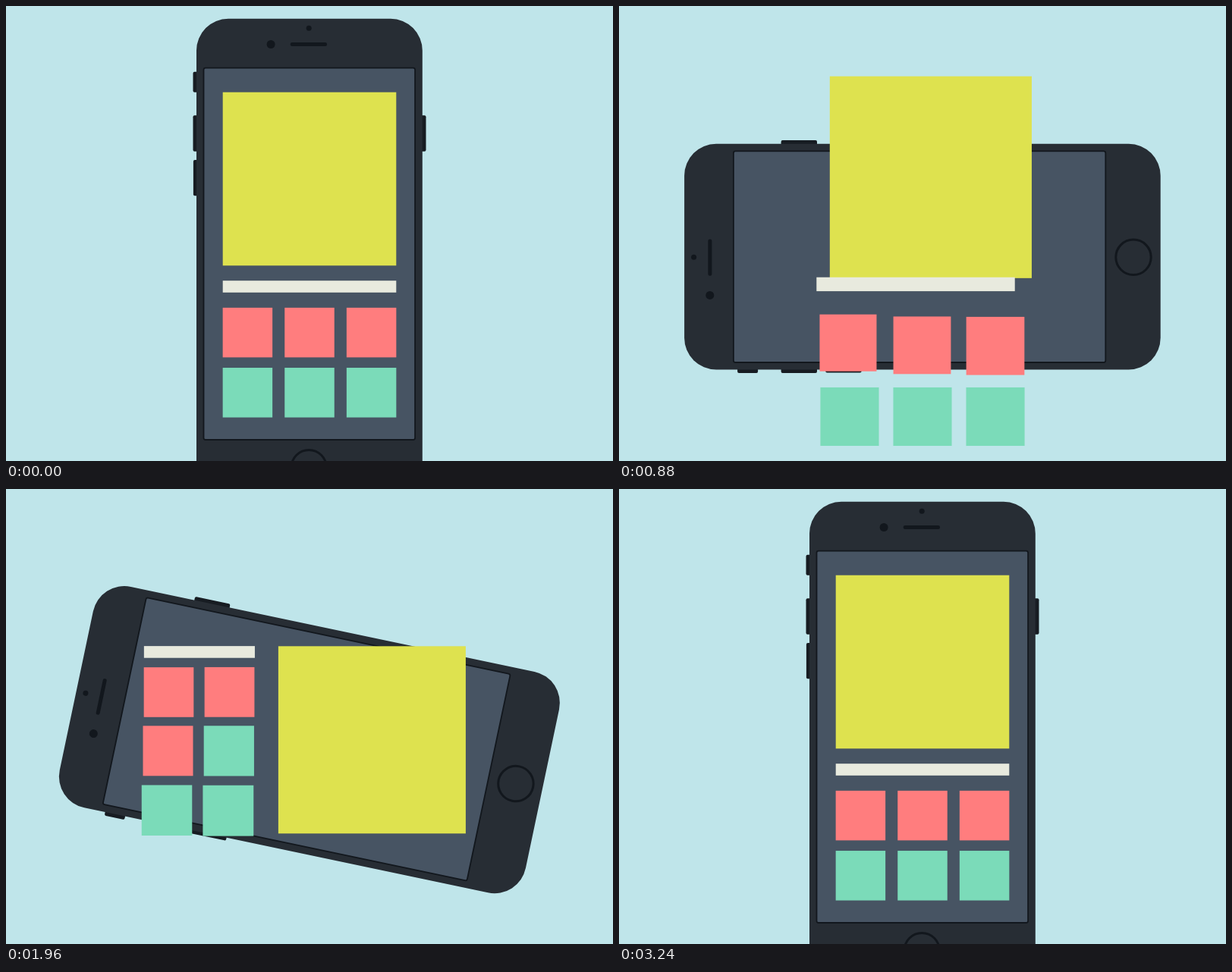
These frames come from a looping animation (800 px wide and 600 px high, 3.48 s). An HTML page with a canvas:

```html
<!DOCTYPE html>
<html lang="en">
<head>
<meta charset="utf-8">
<title>Responsive phone layout</title>
<style>
  html, body { margin: 0; width: 100%; height: 100%; overflow: hidden; background: #bfe5ea; }
  canvas { display: block; width: 800px; height: 600px; }
</style>
</head>
<body>
<canvas id="stage" width="800" height="600"></canvas>
<script>
const ctx = document.getElementById('stage').getContext('2d');
const LOOP = 3480, STEP = 40, UNIT = 870; // ms; one timeline unit is 870 ms
const CX = 399.9, CY = 330.6;
const COLOR = {
  back: '#bfe5ea', body: '#272d34', button: '#171c22', line: '#12171d', screen: '#475463',
  yellow: '#dee24f', bar: '#e8eade', red: '#ff7d7e', green: '#7bdbb9'
};

// Block boxes: centre x, centre y, width, height
const SIZE = 65.5;
const tall = [[400, 228, 228.6, 228.6], [400, 370, 228.6, 15.6]];
const wide = [[482.4, 330.8, 247, 247], [255, 215, 146, 15.6]];
for (let i = 0; i < 6; i++) {
  tall.push([400 + (i % 3 - 1) * 81.6, i < 3 ? 430.6 : 509.8, SIZE, SIZE]);
  wide.push([i % 2 ? 295 : 214.9, 268.1 + (i >> 1) * 77.1, SIZE, SIZE]);
}
const fills = ['yellow', 'bar', 'red', 'red', 'red', 'green', 'green', 'green'].map(n => COLOR[n]);

// Times in units, relative to the start of each half
const halves = [
  { from: tall, to: wide, a0: 0, a1: -90, spin: 0.071, lift: 0.07, liftDur: 0.7, amount: 0.177,
    move: 0.787, moveDur: 0.7, order: i => i },
  { from: wide, to: tall, a0: -90, a1: 0, spin: 0.001, lift: 0.07, liftDur: 0.63, amount: 0.106,
    move: 0.78, moveDur: 0.6, order: i => 7 - i }
];
const SPIN_DUR = 0.72, LIFT_GAP = 0.025, MOVE_GAP = 0.05;

const clamp = v => Math.min(1, Math.max(0, v));
const mix = (a, b, p) => a + (b - a) * p;
const sineInOut = u => (1 - Math.cos(Math.PI * u)) / 2;
const cubicInOut = u => u < 0.5 ? 4 * u ** 3 : 1 - 4 * (1 - u) ** 3;

function bezier(x1, y1, x2, y2) {
  const at = (a, b, s) => 3 * (1 - s) ** 2 * s * a + 3 * (1 - s) * s * s * b + s ** 3;
  return x => {
    if (x <= 0 || x >= 1) return clamp(x);
    let lo = 0, hi = 1;
    for (let i = 0; i < 30; i++) {
      const mid = (lo + hi) / 2;
      if (at(x1, x2, mid) < x) lo = mid; else hi = mid;
    }
    return at(y1, y2, lo);
  };
}
const spinEase = bezier(0.8, 0, 0.3, 1.23);

function roundBox(x, y, w, h, r) {
  ctx.beginPath();
  ctx.moveTo(x + r, y);
  ctx.arcTo(x + w, y, x + w, y + h, r);
  ctx.arcTo(x + w, y + h, x, y + h, r);
  ctx.arcTo(x, y + h, x, y, r);
  ctx.arcTo(x, y, x + w, y, r);
  ctx.closePath();
}

function disc(x, y, r) {
  ctx.beginPath();
  ctx.arc(x, y, r, 0, Math.PI * 2);
}

function button(x, y, h) {
  roundBox(x, y, 10, h, 2);
  ctx.fill();
}

function drawPhone(deg) {
  ctx.save();
  ctx.translate(CX, CY);
  ctx.rotate(deg * Math.PI / 180);

  ctx.fillStyle = COLOR.button;
  button(-153.4, -243.8, 27);
  button(-153.4, -186.3, 47.4);
  button(-153, -127.7, 47.4);
  button(143.6, -186.3, 47.4);

  ctx.fillStyle = COLOR.body;
  roundBox(-148.9, -313.8, 297.8, 627.6, 42);
  ctx.fill();

  ctx.fillStyle = COLOR.screen;
  ctx.strokeStyle = COLOR.line;
  ctx.lineWidth = 1.8;
  roundBox(-139.4, -249, 278.6, 490.4, 2.5);
  ctx.fill();
  ctx.stroke();

  ctx.fillStyle = COLOR.line;
  disc(-50.8, -280.1, 5.5);
  ctx.fill();
  disc(-0.7, -301.3, 3.5);
  ctx.fill();
  roundBox(-25.2, -282.5, 48.4, 5, 2.4);
  ctx.fill();
  ctx.lineWidth = 3;
  disc(-0.7, 278.1, 23.2);
  ctx.stroke();
  ctx.restore();
}

function drawBlock(half, i, t) {
  const k = half.order(i);
  const a = half.from[i], b = half.to[i];
  const scale = 1 + half.amount * sineInOut(clamp((t - half.lift - k * LIFT_GAP) / half.liftDur));
  const u = clamp((t - half.move - k * MOVE_GAP) / half.moveDur);
  const p = cubicInOut(u);
  const pw = i < 2 ? p : u;          // squares shrink at a steady rate
  const ph = i === 1 ? u ** 5 : pw;  // the bar keeps its height until late
  const x = mix(400 + (a[0] - 400) * scale, b[0], p);
  const y = mix(330.8 + (a[1] - 330.8) * scale, b[1], p);
  const w = mix(a[2] * scale, b[2], pw);
  const h = mix(a[3] * scale, b[3], ph);
  ctx.fillStyle = fills[i];
  ctx.fillRect(x - w / 2, y - h / 2, w, h);
}

function draw(ms) {
  const time = Math.floor(ms % LOOP / STEP) * STEP / UNIT;
  const half = halves[time < 2 ? 0 : 1];
  const t = time % 2;
  ctx.fillStyle = COLOR.back;
  ctx.fillRect(0, 0, 800, 600);
  drawPhone(mix(half.a0, half.a1, spinEase((t - half.spin) / SPIN_DUR)));
  for (let i = 0; i < fills.length; i++) drawBlock(half, i, t);
}

const start = performance.now();
function tick() {
  draw(performance.now() - start);
  requestAnimationFrame(tick);
}
tick();
</script>
</body>
</html>
```
